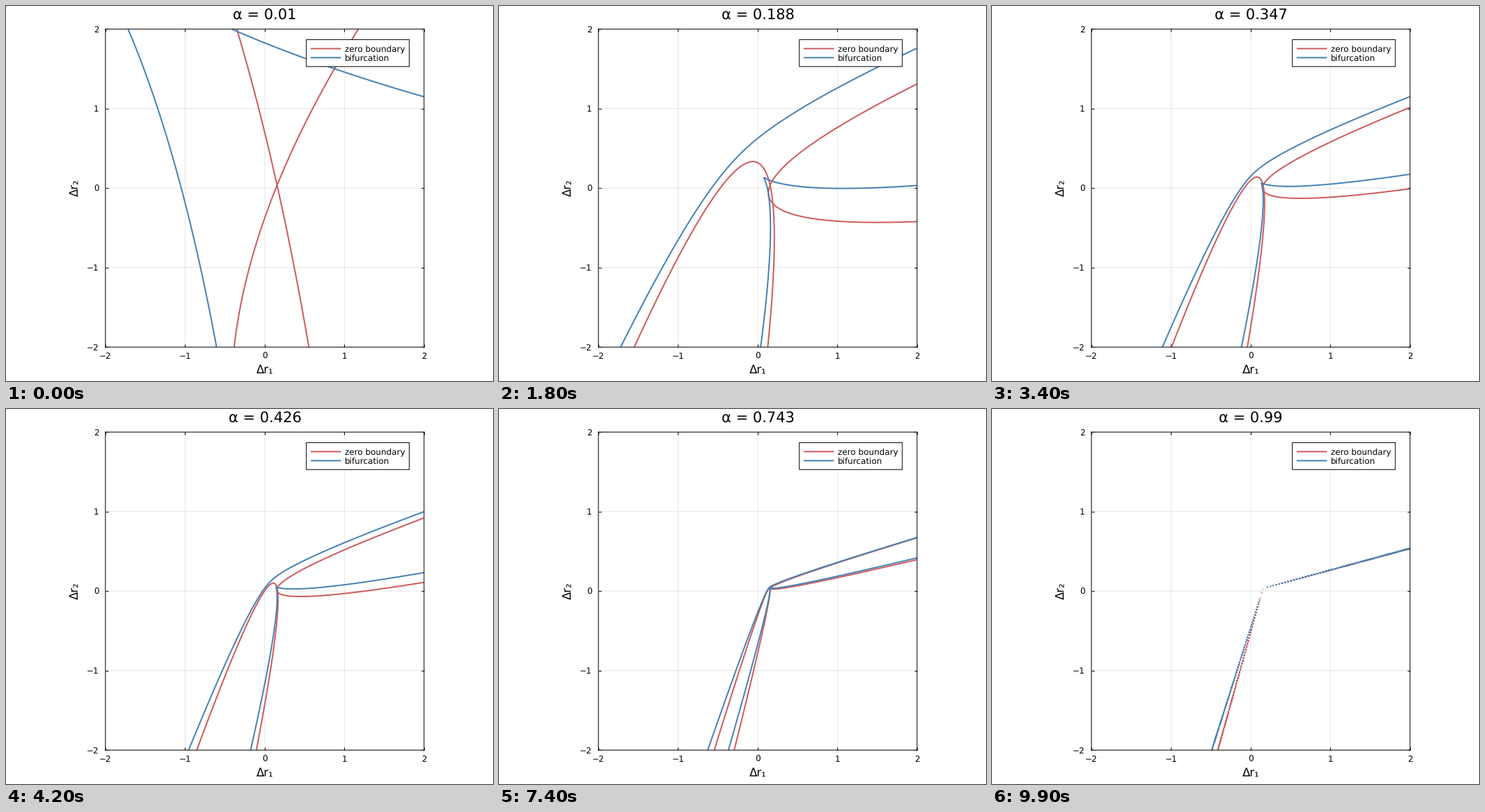
A matplotlib script that plays this animation: 700x540 px, repeating every 10 s.

```python
import numpy as np
import matplotlib.pyplot as plt
from matplotlib.animation import FuncAnimation
from matplotlib.patches import Rectangle

W, H = 700, 540
FRAMES, INTERVAL = 100, 100
RED, BLUE = "indianred", "steelblue"
PT = 0.72  # points per pixel at 100 dpi

plt.rcParams["font.family"] = "DejaVu Sans"
plt.rcParams["text.hinting"] = "none"

# Equilibria: dr = ORIGIN + (1-a)(B1 x + B2 y) + a(C1 x^2 + C2 y^2 + D x y)
ORIGIN = (0.155, 0.035)
B1 = np.array([-1.01, 4.52])
B2 = np.array([1.0, 2.475])
C1 = 16.75 * np.array([-1.0, -3.583])
C2 = 42.4 * np.array([1.0, 0.271])
D = np.array([-21.5, -9.05])

axis = np.linspace(-2, 2, 401)
R1, R2 = np.meshgrid(axis, axis)

# Pencil of the two equilibrium conics, as polynomials in its parameter
a, b, h, f, k = (np.poly1d(v) for v in (C1, C2, D / 2, B1 / 2, B2 / 2))
MINOR = (a * b - h * h).coeffs
CONST = (2 * f * k * h - a * k * k - b * f * f).coeffs


def cross(u, v):
    return u[0] * v[1] - u[1] * v[0]


def zero_boundary(e, lin, quad):
    """Vanishes on the parabola e = lin*s + quad*s^2."""
    s = cross(e, quad) / cross(lin, quad)
    return cross(e, lin) - cross(quad, lin) * s ** 2


def bifurcation(e):
    """Discriminant of the pencil cubic: zero where equilibria merge."""
    e1, e2 = e
    m2, m1, m0 = MINOR
    p = CONST[0] - e1 * m2
    q = CONST[1] - e1 * m1 - e2 * m2
    r = CONST[2] - e1 * m0 - e2 * m1
    t = CONST[3] - e2 * m0
    pt, qr = p * t, q * r
    return (qr * qr - 4 * p * r * r * r - 4 * q * q * q * t
            - 27 * pt * pt + 18 * pt * qr)


fig = plt.figure(figsize=(W / 100, H / 100), dpi=100, facecolor="white")
LEFT, RIGHT, TOP, BOTTOM = 142.9, 600.9, 33.2, 491.2
ax = fig.add_axes([LEFT / W, 1 - BOTTOM / H,
                   (RIGHT - LEFT) / W, (BOTTOM - TOP) / H])
ax.set(xlim=(-2, 2), ylim=(-2, 2))
ticks = range(-2, 3)
ax.set_xticks(ticks)
ax.set_yticks(ticks)
ax.set_axisbelow(True)
ax.grid(color="black", alpha=0.1, linewidth=PT)
ax.tick_params(direction="in", top=True, right=True, length=4 * PT,
               width=PT, labelbottom=False, labelleft=False)
for spine in ax.spines.values():
    spine.set(linewidth=PT, snap=False)
for line in ax.get_xgridlines() + ax.get_ygridlines():
    line.set_snap(False)


def label(x, y, text, size, ha="center", **kw):
    return fig.text(x / W, 1 - y / H, text, fontsize=size * PT, ha=ha,
                    **{"va": "baseline", **kw})


for v in ticks:
    name = str(v).replace("-", "\u2212")
    step = (RIGHT - LEFT) / 4
    label(LEFT + (v + 2) * step, 507.5, name, 12)
    label(133.7, BOTTOM - (v + 2) * step + 4.5, name, 12, ha="right")
label(372, 529, "Δr₁", 16.5)
label(107, 262, "Δr₂", 16.5, ha="right", va="center", rotation=90)
title = label(372, 18.5, "", 21)

# Legend on a pixel-coordinate layer above the plot
top = fig.add_axes([0, 0, 1, 1], zorder=5)
top.set(xlim=(0, W), ylim=(H, 0))
top.axis("off")
top.add_patch(Rectangle((431.7, 48.4), 148, 38.8, facecolor="white",
                        edgecolor="black", linewidth=PT, snap=False))
for y, color, name in ((61.4, RED, "zero boundary"),
                       (74.4, BLUE, "bifurcation")):
    top.plot([438, 481.5], [y, y], color=color, linewidth=2 * PT,
             solid_capstyle="butt", snap=False)
    top.text(487, y + 4.6, name, fontsize=12 * PT, va="baseline")

curves = []


def update(i):
    alpha = 0.01 + 0.98 * i / (FRAMES - 1)
    title.set_text(f"α = {round(alpha, 3)}")
    while curves:
        curves.pop().remove()
    scale = (1 - alpha) ** 2 / alpha
    e = (R1 - ORIGIN[0]) / scale, (R2 - ORIGIN[1]) / scale
    for field, color in ((zero_boundary(e, B1, C1), RED),
                         (zero_boundary(e, B2, C2), RED),
                         (bifurcation(e), BLUE)):
        curves.append(ax.contour(axis, axis, field, [0], colors=color,
                                 linewidths=2 * PT, zorder=2))
    return [title]


anim = FuncAnimation(fig, update, frames=FRAMES, interval=INTERVAL,
                     repeat=True, repeat_delay=0, blit=False)
plt.show()
```
